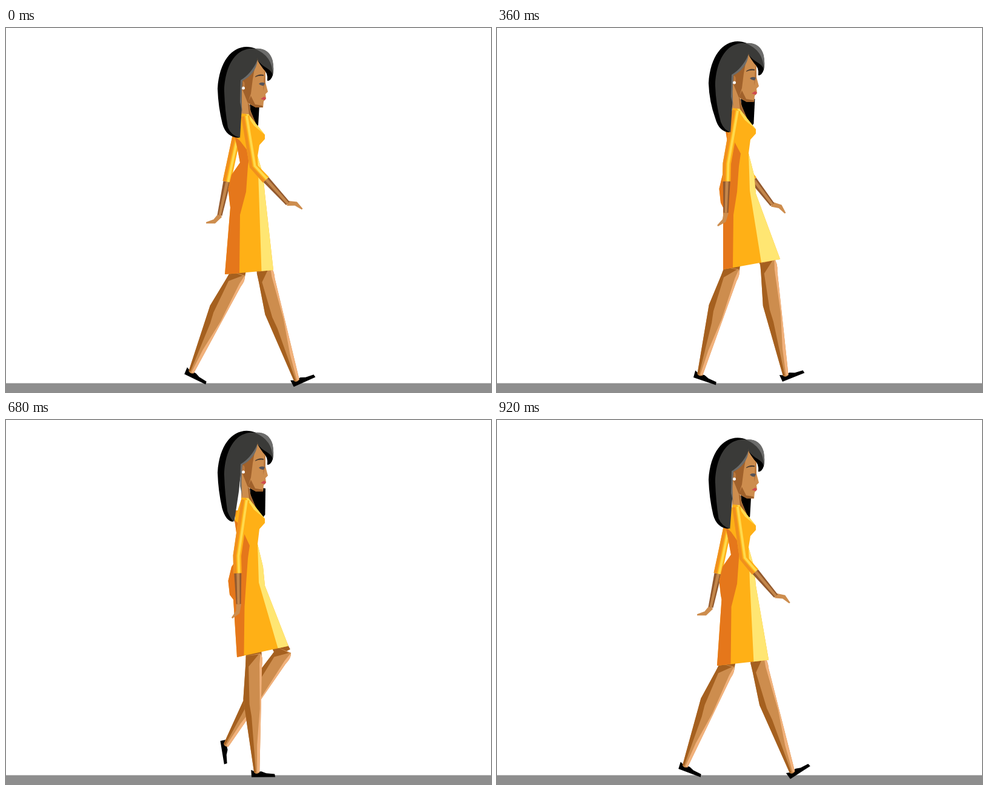
Recreate the animation shown at these times as an HTML page with a canvas. Size 800 by 600 pixels, loop 960 ms.

```html
<!DOCTYPE html>
<html lang="en">
<head>
<meta charset="utf-8">
<title>Walk cycle</title>
<style>
html, body { margin: 0; width: 100%; height: 100%; overflow: hidden; background: #fff; }
canvas { display: block; }
</style>
</head>
<body>
<canvas id="stage" width="800" height="600"></canvas>
<script>
const ctx = document.getElementById('stage').getContext('2d');
const { PI, cos, sin, atan2, hypot, floor, min, max } = Math;
const LOOP = 960, STEP = 40;
const SKIN = '#cd8d4e', SKIN_DARK = '#a5601f', SKIN_LIGHT = '#f2b27c', SKIN_SHADE = '#a0612b';
const ORANGE = '#e5771b', AMBER = '#ffb016', LEMON = '#ffe672';
const HAIR = '#3a3a38', HAIR_GREY = '#6c6c6b';

// Periodic motion: a mean plus [cosine, sine] amplitudes of successive harmonics.
const wave = (a, mean, ...harmonics) => harmonics.reduce(
  (sum, [c, s = 0], k) => sum + c * cos((k + 1) * a) + s * sin((k + 1) * a), mean);

function fill(color, path) {
  ctx.fillStyle = color;
  ctx.fill(new Path2D(path));
}

const poly = (color, ...points) => fill(color, 'M' + points.join('L') + 'Z');

function placed(x, y, angle, paint) {
  ctx.save();
  ctx.translate(x, y);
  ctx.rotate(angle);
  paint();
  ctx.restore();
}

// Band along a chain of [x, y, from, to], offsets measured across it.
function band(color, joints) {
  const near = [], far = [];
  joints.forEach(([x, y, from, to], i) => {
    const a = joints[max(i - 1, 0)], b = joints[min(i + 1, joints.length - 1)];
    const len = hypot(b[0] - a[0], b[1] - a[1]);
    const nx = (b[1] - a[1]) / len, ny = (a[0] - b[0]) / len;
    near.push([x + nx * from, y + ny * from]);
    far.unshift([x + nx * to, y + ny * to]);
  });
  poly(color, ...near, ...far);
}

function drawLeg(a) {
  const kneeX = wave(a, 419, [21, -27], [-15, 2], [2, 3]);
  const kneeY = wave(a, 396, [-3, 5], [10, 1]);
  const ankleX = wave(a, 393, [90, -3], [-1, -12], [-3, -4]);
  const ankleY = wave(a, 567, [11, 16], [7, -5], [-4, -2]);
  const tilt = wave(a, 18.5, [-33, -21], [-16, 18.5], [8, 8.5]) * PI / 180;
  const dx = ankleX - kneeX, dy = ankleY - kneeY;

  band(SKIN_DARK, [[405, 280, -13, 13], [kneeX, kneeY, -13, 13]]);
  placed(ankleX, ankleY, tilt, () =>
    fill('#000', 'M-9 -4L-2 -1L8 -2L16 1L30 2L31 7L-8 8Z'));
  placed(kneeX, kneeY, atan2(dy, dx) - PI / 2, () => {
    ctx.scale(1, hypot(dx, dy) / 184);
    fill(SKIN, 'M-13 -3L-14 12L-19 66L-4 184Q0 188 5 184L13 14Q16 0 11 -7Z');
    fill(SKIN_DARK, 'M-13 -3L-14 12L-19 66L-4 184L-1 184L-6 94L-9 74L-9 14L8 -5Z');
    fill(SKIN_LIGHT, 'M11 -6Q16 0 13 14L5 184L1 184L2 140L8 82L9 10Z');
  });
}

function drawArm(a, shoulderX, shoulderY) {
  const swing = cos(a);
  const ex = 390 + 19 * swing, ey = 225 + 3 * swing;
  const wx = 409 + 57 * swing, wy = 299 - 10 * swing;
  const cx = ex + (wx - ex) * 0.36, cy = ey + (wy - ey) * 0.36;
  const turn = (86 - 66 * swing) * PI / 180;
  const sleeve = (color, from, to) => band(color,
    [[shoulderX, shoulderY], [ex, ey], [cx, cy]].map(p => [...p, from, to]));

  placed(wx, wy, turn, () => fill(SKIN, 'M-2 -4L13 -8L26 -1L25 1L12 -1L0 4Z'));
  band('#945a2e', [[cx, cy, -6, 6], [wx, wy, -4, 4]]);
  band('#c4874b', [[cx, cy, -2, 3], [wx, wy, -2, 2]]);
  sleeve(AMBER, -7, 6.5);
  sleeve('#f0901d', -7, -2);
  sleeve('#ffda4c', 0, 4);
}

function drawDress(a, bob) {
  const lx = wave(a, 372, [-11, -1]), ly = wave(a, 398, [8]);
  const rx = wave(a, 457, [-16, -10]), ry = wave(a, 384, [15, 3]);
  const shade = wave(a, 389, [-4]), light = wave(a, 436, [-14.5]);
  const hem = x => [x, ly + (ry - ly) * (x - lx) / (rx - lx)];
  const back = [[lx, ly], [370 + (lx - 361) * 0.25, 296], [369, 288], [366.5, 265],
    [372, 242], [386, 222], [382, 200], [377, 178 + bob]];
  const hip = [[424, 242], [427, 273], [rx, ry]];
  const neckline = [[400, 142 + bob], [411, 156 + bob], [427, 176 + bob]];
  const waist = [415, 211 + bob / 2];

  poly(AMBER, [389, 141 + bob], ...neckline, [427, 183 + bob], [418, 193 + bob],
    waist, ...hip, ...back);
  poly(ORANGE, ...back, [386, 186 + bob], [402, 207], [399, 228], [396, 270],
    [shade + 1, 308], hem(shade));
  poly(LEMON, waist, ...hip, hem(light), [417, 268]);
  poly('#ffdc50', [396, 142 + bob], ...neckline, [409, 161 + bob]);
}

function drawNeck(a) {
  const x = wave(a, 422, [-6, -4]), y = wave(a, 169, [-5, -3]);
  fill('#000', `M402 122L${min(x + 2, 428)} 126L${x} ${y - 4}L${x - 3} ${y}L411 156L403 138Z`);
  fill(SKIN, 'M388 95L388 145L400 146L412 157L404 138L401 126Z');
  fill(SKIN_SHADE, 'M399 123L402 127L403 138L412 157L401 144Z');
}

function drawFace() {
  fill(SKIN, 'M414 48L428 68L428 90L432 105L428 109L429 116L425 121L424 131L412 131L399 124L391 104L390 84Z');
  fill(SKIN_SHADE, 'M412 56L407 84L404 108L399 124L391 104L390 86Z');
  fill(SKIN_SHADE, 'M399 123L412 131L424 131L423 128L411 126L404 112Z');
  fill('#b9773d', 'M427 68L428 90L424 104L425 84ZM388 88Q395 86 394 96L391 104L388 102Z');
  fill('#fff', 'M389 99a2.5 2.5 0 1 0 5 0a2.5 2.5 0 1 0 -5 0');
  fill('#4b3b30', 'M411 80Q417 75 425 77L425 79Q417 78 411 81Z');
  fill('#54535a', 'M417 92Q421 88 427 91L425 95Q421 96 417 92Z');
  fill('#cf4a50', 'M420 117L426 113L429 116L427 119Z');
}

function drawHair(a) {
  const tip = wave(a, 383, [3, 6]), back = wave(a, 358, [-1, 2]);
  fill('#000', `M412 34C382 22 352 46 349 100Q350 130 ${back} 158Q${back + 6} 180 ${tip - 2} 181L390 85Z`);
  fill(HAIR, `M412 34C372 30 360 75 360 105Q361 135 ${back + 9} 164Q${back + 14} 177 ${tip} 181L${tip / 2 + 196} 130L388 88Q406 78 415 52Z`);
  fill(HAIR_GREY, 'M415 53Q412 76 390 87Q387 118 390 140L386 122L387 86Q404 76 415 53Z');
  fill(HAIR, 'M409 35Q431 31 439 52Q443 68 440 78Q437 87 431 87Q433 74 424 66Q418 60 415 52Z');
  fill('#000', 'M414 52Q421 61 430 66Q438 71 440 77Q437 87 431 87Q433 75 424 67Z');
  fill(HAIR_GREY, 'M410 34Q434 32 440 54Q442 66 440 77Q440 46 410 34Z');
}

function draw(t) {
  const a = 2 * PI * t / LOOP, stepAngle = 2 * a;
  const bob = wave(stepAngle, -7.5, [7.5, 1.5]);
  ctx.fillStyle = '#fff';
  ctx.fillRect(0, 0, 800, 600);
  ctx.fillStyle = '#8e8e8e';
  ctx.fillRect(0, 585.5, 800, 14.5);

  // The far arm leads its half cycle slightly, the near arm lags.
  drawArm(a + PI + 0.13, 384, 162 + bob);
  drawLeg(a);
  drawLeg(a + PI);
  placed(0, bob, 0, () => drawNeck(a));
  drawDress(stepAngle, bob);
  drawArm(a - 0.2, 395, 145 + bob);
  placed(0, bob, 0, () => {
    drawFace();
    drawHair(a);
  });
}

function frame() {
  draw(floor(performance.now() % LOOP / STEP) * STEP);
  requestAnimationFrame(frame);
}
frame();
</script>
</body>
</html>
```
